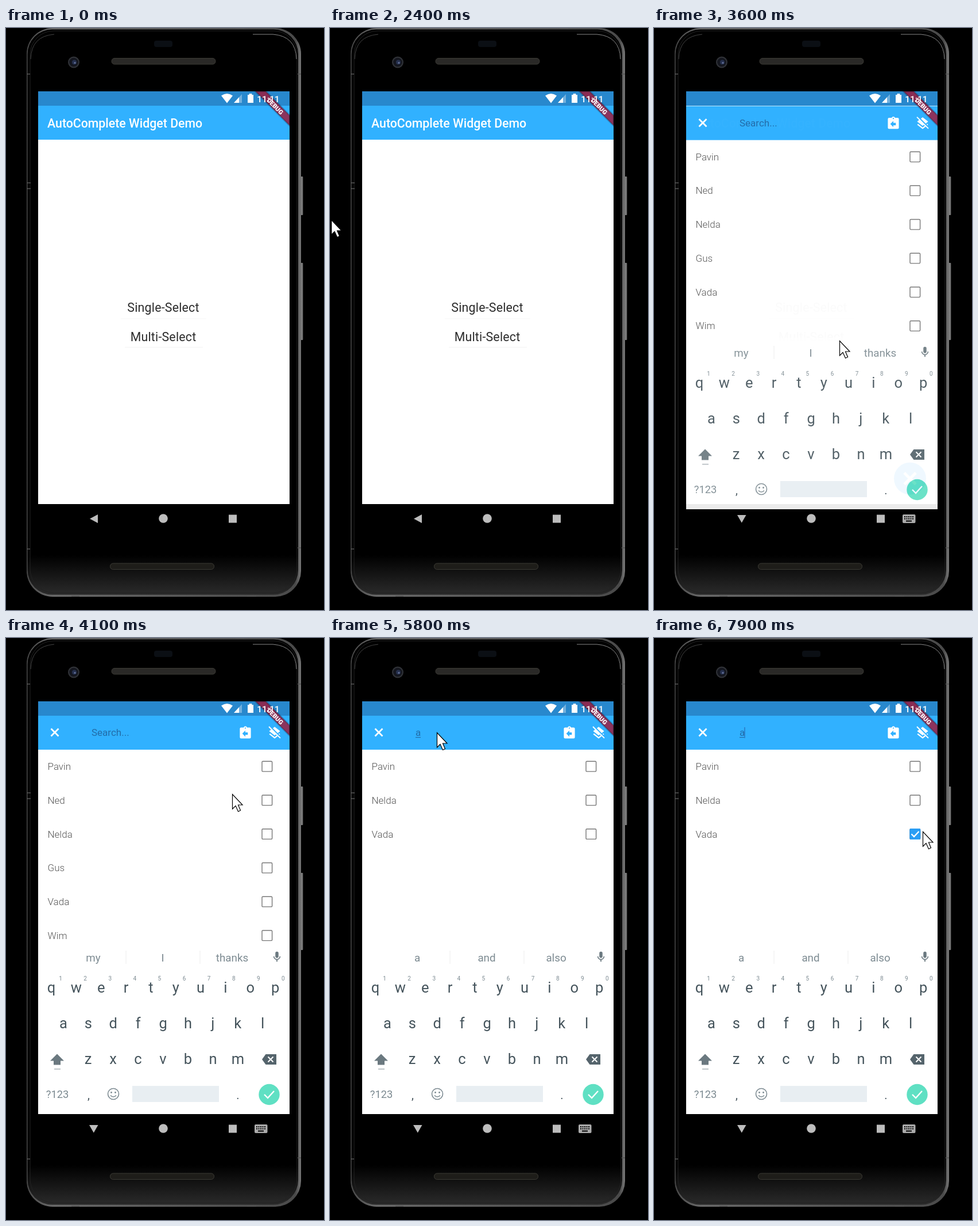
An HTML page for the animation above (8 s loop, 554 by 1011 pixels).

```html
<!DOCTYPE html>
<html lang="en">
<head>
<meta charset="utf-8">
<title>AutoComplete Widget Demo</title>
<style>
html, body { margin: 0; width: 100%; height: 100%; overflow: hidden; background: #000; }
svg { display: block; width: 554px; height: 1011px; font-family: Roboto, sans-serif; }
.mid { text-anchor: middle; }
.title { font-size: 21.3px; font-weight: 500; fill: #fff; }
.button { font-size: 21.3px; letter-spacing: .22px; fill: #2c2c2c; }
.row { font-size: 17px; font-weight: 300; fill: #555; }
.search { font-size: 17px; fill: #226ca8; }
.key { font-size: 25.5px; fill: #45545c; }
.digit { font-size: 10px; fill: #7c8a91; }
.hint { font-size: 18.8px; fill: #7c8a91; }
</style>
</head>
<body>
<svg id="stage" viewBox="0 0 554 1011"></svg>
<script>
const LOOP = 8000, STEP = 100, ROW = 58.75;
const BAR = '#31b1ff';
const stage = document.getElementById('stage');

const rect = (x, y, w, h, fill, more = '') =>
  `<rect x="${x}" y="${y}" width="${w}" height="${h}" fill="${fill}" ${more}/>`;
const circle = (x, y, r, fill, more = '') =>
  `<circle cx="${x}" cy="${y}" r="${r}" fill="${fill}" ${more}/>`;
const path = (d, fill, more = '') => `<path d="${d}" fill="${fill}" ${more}/>`;
const line = (d, color, width, more = '') =>
  path(d, 'none', `stroke="${color}" stroke-width="${width}" ${more}`);
const text = (x, y, cls, s, more = '') => `<text x="${x}" y="${y}" class="${cls}" ${more}>${s}</text>`;
// A 24-unit icon centred on (x, y)
const icon = (x, y, size, fill, d) =>
  path(d, fill, `transform="translate(${x - size / 2} ${y - size / 2}) scale(${size / 24})"`);

function phone() {
  const bar = (x, y, w, h, fill) => rect(x, y, w, h, fill, 'rx="5" stroke="#3b3a34"');
  return `<defs>
    <linearGradient id="edge">
      <stop stop-color="#4a4a4a"/><stop offset=".1" stop-color="#6a6a6a"/>
      <stop offset=".98" stop-color="#4a4a4a"/><stop offset="1" stop-color="#777"/>
    </linearGradient>
    <linearGradient id="body" x2="0" y2="1">
      <stop offset=".93"/><stop offset="1" stop-color="#2b2b2b"/>
    </linearGradient>
    <linearGradient id="side"><stop stop-color="#333"/><stop offset=".6" stop-color="#8a8a8a"/><stop offset="1" stop-color="#555"/></linearGradient>
    <clipPath id="screen">${rect(56, 110, 438, 717, '#fff')}</clipPath>
    <clipPath id="panel">${rect(56, 110, 438, 726, '#fff')}</clipPath>
  </defs>`
  + rect(0, 0, 554, 1011, '#000')
  + rect(512, 258, 5.5, 67, 'url(#side)', 'rx="1"') + rect(512, 408, 5.5, 134, 'url(#side)', 'rx="1"')
  + rect(36, 0, 478, 988, 'url(#edge)', 'rx="45"')
  + rect(37.5, 2.5, 471.5, 982, 'url(#body)', 'rx="43"')
  + rect(42, 5, 465, 976, 'none', 'rx="41" stroke="#222"')
  + line('M430 11H465Q505 14 506 54', '#888', 1) + line('M43 54Q44 14 84 11', '#444', 1)
  + line('M36 80h6M508 80h6M36 269h7M36 279h7M508 903h6M36 905h6M114 987h14M420 987h16M400 1h15', '#555', 1.3)
  + rect(258, 22, 32, 11, '#0b0f14', 'rx="4"')
  + circle(118, 59.5, 10, '#303237') + circle(118, 59.5, 7.8, '#14161e')
  + circle(119, 59.5, 4, '#26304e') + circle(120, 60.5, 1.6, '#66749c')
  + bar(184, 52.5, 181, 10.5, '#2a2927') + bar(181.5, 930, 181, 10.5, '#1e1d19');
}

const appBar = () => rect(56, 110, 438, 717, '#fff') + rect(56, 135, 438, 59, BAR);

function home() {
  return appBar() + text(72, 173, 'title', 'AutoComplete Widget Demo')
    + text(274, 493, 'button mid', 'Single-Select') + text(274, 544, 'button mid', 'Multi-Select')
    + rect(200, 504.5, 149, 1, '#f7f7f7') + rect(207, 554, 136, 1, '#f3f3f3');
}

function statusBar() {
  return path('M375 117.5Q385 110.5 395 117.5L385 130.5Z', '#fff')
    + path('M411 115V130H397Z', '#fff', 'opacity=".35"') + path('M406 120.3V130H397Z', '#fff')
    + path('M421 116h2.7v-2h4.6v2h2.7v14h-10Z', '#fff')
    + path('M434.5 110H452.5L494 151.5V169.5Z', '#a0183a', 'opacity=".82" stroke="#000" stroke-opacity=".25" stroke-width="3"')
    + text(0, 4, 'mid', 'DEBUG', 'transform="translate(469 136) rotate(45)" font-size="10.9" font-weight="900" fill="#fff"')
    + text(457, 128.5, 'mid', '11:11', 'font-size="15.5" font-weight="500" fill="#fff"');
}

const people = ['Pavin', 'Ned', 'Nelda', 'Gus', 'Vada', 'Wim'];
const matches = people.filter(name => name.includes('a'));

const list = names => names.map((name, i) => {
  const y = 223 + i * ROW;
  return text(72.5, y + 6, 'row', name)
    + rect(446, y - 8.7, 17.6, 17.6, 'none', 'rx="1.5" stroke="#777" stroke-width="1.4"');
}).join('');

function searchPage() {
  return appBar()
    + line('M78.5 157.5l13 13m0-13l-13 13', '#fff', 2.8)
    + icon(417, 165, 25.6, '#fff', 'M19 3h-4.2a3 3 0 0 0-5.6 0H5a2 2 0 0 0-2 2v14a2 2 0 0 0 2 2h14a2 2 0 0 0 2-2V5a2 2 0 0 0-2-2zm-7 0a1 1 0 0 1 0 2 1 1 0 0 1 0-2zm4 12h-4v3l-5-5 5-5v3h4z')
    + icon(468, 165, 25.6, '#fff', 'M19.8 15l1.2-.9-1.4-1.5-1.2 1zM19.4 10.3L21 9l-9-7-2.9 2.3 7.9 7.9zM3.3 1L2 2.3l4.2 4.2L3 9l9 7 2.1-1.6 1.4 1.4-3.5 2.7-7.4-5.7L3 14.1l9 7 5-3.9 3.7 3.8 1.3-1.3z')
    + `<g id="blank">${text(149, 170, 'search', 'Search...')}${list(people)}</g>`
    + `<g id="typed">${text(149, 170, 'search', 'a')}${rect(149, 172, 9, 1.2, '#226ca8')}${list(matches)}</g>`
    + rect(157, 155, 2, 19, '#2a86d2', 'id="caret"')
    + `<g id="check">${rect(445.3, 331, 19, 19, '#2a9df4', 'rx="2"')}${line('M448.5 340.5l4.5 4.5 8.5-9', '#fff', 2.3)}</g>`
    + `<g id="fab">${circle(446, 782, 28, BAR)}${line('M436 772l20 20m0-20l-20 20', '#fff', 5)}</g>`;
}

function keyboard() {
  const keys = (letters, x, step, y) =>
    [...letters].map((c, i) => text(x + i * step, y, 'key mid', c)).join('');
  const hints = (id, words) => `<g id="${id}">`
    + words.map((w, i) => text(152 + i * 121, 561.5, 'hint mid', w)).join('') + '</g>';
  return rect(56, 529, 438, 298, '#fff')
    + rect(208.5, 543, 1, 23, '#eee') + rect(337.5, 543, 1, 23, '#eee')
    + hints('early', ['my', 'I', 'thanks']) + hints('late', ['a', 'and', 'also'])
    + icon(472, 554, 22, '#6b7980', 'M12 14a3 3 0 0 0 3-3V5a3 3 0 0 0-6 0v6a3 3 0 0 0 3 3zm5-3a5 5 0 0 1-10 0H5.3c0 3.4 2.7 6.2 5.7 6.7V21h2v-3.3c3-.5 5.7-3.3 5.7-6.7z')
    + keys('qwertyuiop', 79, 43.35, 615.8) + keys('asdfghjkl', 100, 43.4, 677.5) + keys('zxcvbnm', 143, 43.5, 740)
    + [...'1234567890'].map((d, i) => text(95 + i * 43.1, 595, 'digit mid', d)).join('')
    + path('M89 722.5l12 12h-6v7h-12v-7h-6Z', '#6b7980') + rect(84, 748, 11, 1.5, '#aab3b8')
    + path('M446 732l6.5-9H471v18H452.5Z', '#55646c') + line('M456.5 727.5l9 9m0-9l-9 9', '#fff', 2)
    + text(89.5, 799, 'hint mid', '?123', 'style="font-size:18.3px"')
    + text(144, 801, 'key mid', ',', 'style="font-size:20px"') + text(404, 801, 'key mid', '.', 'style="font-size:20px"')
    + circle(187, 792, 9.5, 'none', 'stroke="#7c8a91" stroke-width="1.6"')
    + circle(183.5, 789.5, 1.4, '#7c8a91') + circle(190.5, 789.5, 1.4, '#7c8a91')
    + line('M182 794.5q5 5 10 0', '#7c8a91', 1.6)
    + rect(220, 778, 151, 28, '#e8eef2')
    + circle(458.5, 793, 18.2, '#5fe0c3') + line('M450 793l6 6 11-12', '#fff', 2.4);
}

function navBar() {
  const grey = '#bdbdbd';
  const dots = [0, 1, 2, 3, 4].map(i => rect(436 + i * 3.5, 848, 2, 2, '#000') + rect(436 + i * 3.5, 851.5, 2, 2, '#000')).join('');
  return path('M146 852.5l14-7.5v15Z', grey, 'id="back"') + path('M145 846h15.5l-7.7 13.5Z', grey, 'id="down"')
    + circle(274, 852, 7.8, grey) + rect(388, 845.5, 14, 14, grey)
    + `<g id="switch">${rect(433, 845, 22.5, 15, '#aaa', 'rx="2"')}${dots}${rect(439, 855.5, 10, 2, '#000')}</g>`;
}

stage.innerHTML = phone()
  + `<g clip-path="url(#screen)">${home()}<g id="page">${searchPage()}</g>${rect(56, 110, 438, 25, '#2888cd')}${statusBar()}</g>`
  + navBar()
  + `<g clip-path="url(#panel)"><g id="keys">${keyboard()}</g></g>`
  + `<g id="pointer">${path('M.5 .5V26L6 20.5L10.5 30.5L14.5 28.5L10.5 19H18Z', '#fff', 'stroke="#000" stroke-width="1.2"')}</g>`;

const part = {};
stage.querySelectorAll('g[id], path[id], rect[id]').forEach(el => part[el.id] = el);

// Pointer stops: time, x, y. It is off the stage between the two trips.
const trips = [
  [[1400, 513, 462], [1600, 420, 300], [1800, 300, 150], [1900, 200, 9]],
  [[2400, 2, 333], [2500, 150, 400], [2700, 402, 515], [3000, 331, 545], [3300, 331, 545],
   [3600, 323, 543], [3800, 335, 460], [4100, 394, 271], [4200, 402, 272], [4300, 402, 272],
   [4400, 415, 281], [4800, 190, 150], [5000, 189, 152], [5200, 186, 164], [6100, 186, 164],
   [6500, 481, 245], [6600, 482, 250], [7000, 471, 333], [7300, 470, 336], [7600, 470, 336], [7800, 468, 336]]
];
const clamp = v => Math.max(0, Math.min(1, v));
const show = (name, on) => part[name].setAttribute('visibility', on ? 'inherit' : 'hidden');
const place = (name, x, y) => part[name].setAttribute('transform', `translate(${x} ${y})`);
const fade = (name, a) => part[name].setAttribute('opacity', a);

function movePointer(t) {
  const stops = trips[t < 2400 ? 0 : 1];
  const last = stops[stops.length - 1];
  show('pointer', t >= stops[0][0] && (t <= last[0] || t >= 2400));
  const i = stops.findIndex(s => s[0] > t);
  if (i < 1) return place('pointer', last[1], last[2]);
  const [a, b] = [stops[i - 1], stops[i]];
  const p = (t - a[0]) / (b[0] - a[0]);
  place('pointer', a[1] + (b[1] - a[1]) * p, a[2] + (b[2] - a[2]) * p);
}

function draw(t) {
  const enter = clamp((t - 3300) / 320), rise = clamp((t - 3400) / 300);
  place('page', 0, 179 * (1 - enter) ** 2);
  fade('page', 1 - (1 - enter) ** 1.5);
  place('keys', 0, 243 * (1 - rise) ** 3);
  fade('keys', 1 - (1 - rise) ** 2.3);

  const open = t >= 3400, typed = t >= 5500;
  show('back', !open);
  show('down', open);
  show('switch', open);
  show('fab', rise < 1);
  show('blank', !typed);
  show('typed', typed);
  show('early', t < 5600);
  show('late', t >= 5600);
  show('caret', t >= 7700);
  fade('check', clamp((t - 7600) / 200));
  movePointer(t);
}

function tick() {
  draw(Math.floor(performance.now() % LOOP / STEP) * STEP);
  requestAnimationFrame(tick);
}
tick();
</script>
</body>
</html>
```
